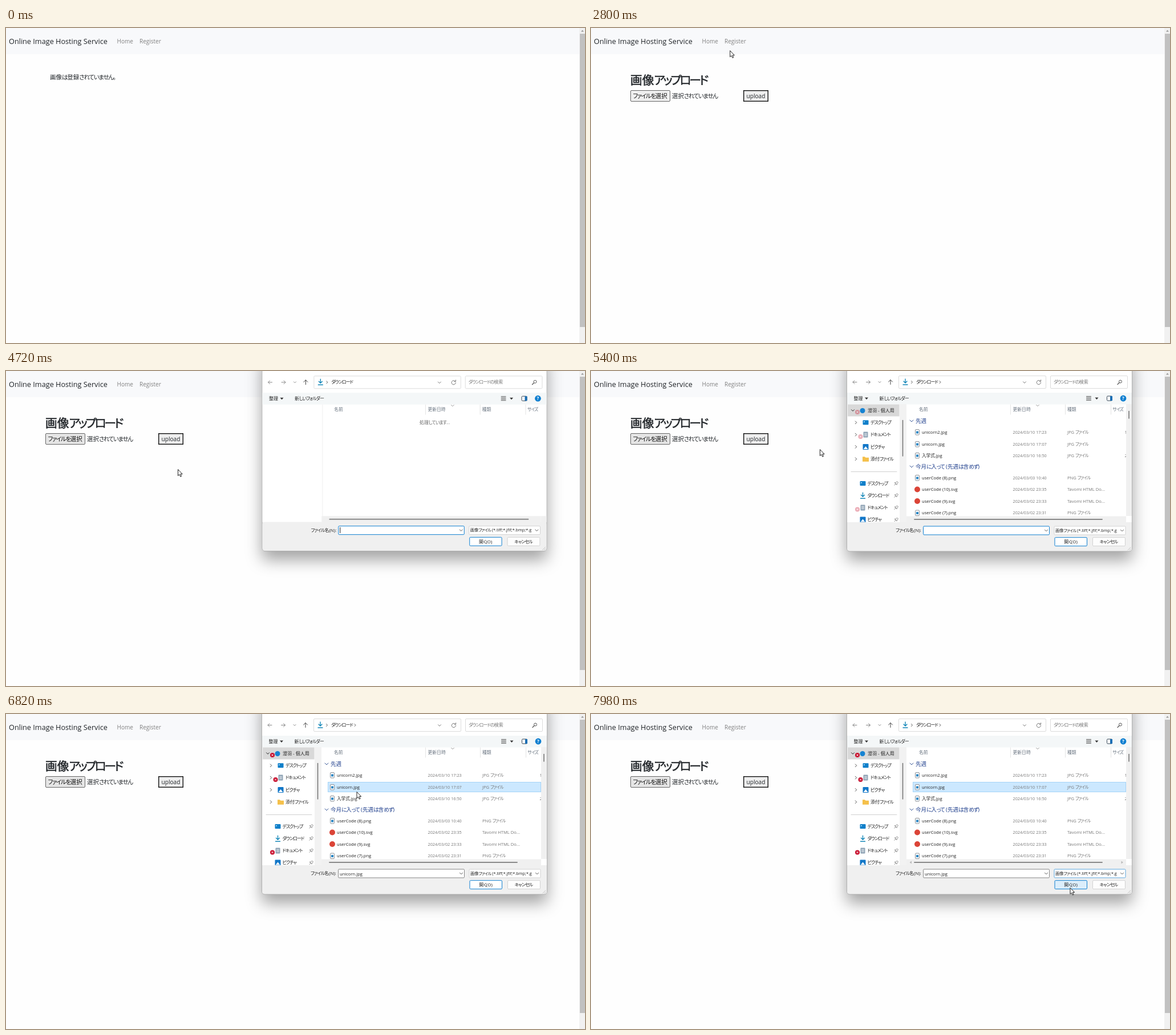
Animation of 1015x552 px, one loop 8000 ms. Source, as an HTML page:

```html
<!DOCTYPE html>
<html lang="ja">
<head>
<meta charset="utf-8">
<style>
html, body { margin: 0; width: 100%; height: 100%; overflow: hidden; background: #fefefe; }
svg { display: block; font-family: "Open Sans", "Noto Sans CJK JP", "Noto Sans CJK", sans-serif; }
text { white-space: pre; }
.kana { font-feature-settings: "palt"; letter-spacing: -.12em; }
.heading { stroke: #212529; stroke-width: .5; }
.heading .kana { letter-spacing: -.15em; }
.line { fill: none; stroke-linecap: round; stroke-linejoin: round; }
#window { filter: drop-shadow(0 15px 14px rgba(0, 0, 0, .36)); }
</style>
</head>
<body>
<svg id="stage" width="1015" height="552" viewBox="0 0 1015 552"></svg>
<script>
// Text is centred vertically on y; kana runs are set proportionally.
const text = (x, y, s, size = 8, fill = '#222', attrs = '') =>
  `<text x="${x}" y="${y + size * .36}" font-size="${size}" fill="${fill}" ${attrs}>` +
  s.replace(/[\u3040-\u30ff]+/g, '<tspan class="kana">$&</tspan>') + '</text>';
const rect = (x, y, w, h, fill, attrs = '') =>
  `<rect x="${x}" y="${y}" width="${w}" height="${h}" fill="${fill}" ${attrs}/>`;
const box = (x, y, w, h, fill, stroke, attrs = '') =>
  rect(x + .5, y + .5, w - 1, h - 1, fill, `stroke="${stroke}" rx="1.5" ${attrs}`);
const line = (d, color = '#555', width = 1, attrs = '') =>
  `<path class="line" d="${d}" stroke="${color}" stroke-width="${width}" ${attrs}/>`;
const dot = (x, y, r, fill) => `<circle cx="${x}" cy="${y}" r="${r}" fill="${fill}"/>`;
const down = (x, y, r = 2.5, color) => line(`M${x - r} ${y - r / 2}l${r} ${r}l${r} ${-r}`, color);
const right = (x, y, r = 2, color) => line(`M${x - r / 2} ${y - r}l${r} ${r}l${-r} ${r}`, color);
const triangle = (x, y) => `<path d="M${x - 3} ${y - 1.5}h6l-3 3.5z" fill="#333"/>`;
const group = (id, body, attrs = '') => `<g id="${id}" ${attrs}>${body}</g>`;

const icons = {
  desktop: (x, y) => rect(x - 5, y - 4, 10, 8, '#0f7fc9', 'rx="1"') + rect(x - 3.5, y - 2, 2, 1.5, '#bfe6ff'),
  download: (x, y) => line(`M${x} ${y - 5}v7m-3 -3l3 3l3 -3M${x - 4} ${y + 5}h8`, '#1487b8', 1.4),
  document: (x, y) => rect(x - 4, y - 5, 8, 10, '#8fa3b5', 'rx="1"') +
    line(`M${x - 2} ${y - 2}h4m-4 2h4m-4 2h4`, '#fff', .8),
  picture: (x, y) => rect(x - 5, y - 5, 10, 10, '#1277c8', 'rx="1"') +
    `<path d="M${x - 4} ${y + 4}l4 -5l4 5z" fill="#fff"/>`,
  folder: (x, y) => `<path d="M${x - 5.5} ${y - 4}h4l1.5 1.5h5.5v7h-11z" fill="#f5c04a"/>`,
  account: (x, y) => dot(x, y, 4.5, '#1683d2'),
  image: (x, y) => box(x - 4, y - 5, 8, 10.5, '#fff', '#8a8f96') + rect(x - 2, y - 1.5, 4, 4, '#2a86c4'),
  svg: (x, y) => dot(x, y, 5, '#db4437')
};
const alertMark = (x, y) => dot(x, y, 4, '#c8102e') + line(`M${x - 1.3} ${y - 1.3}l2.6 2.6m0 -2.6l-2.6 2.6`, '#fff', .9);
const pin = (x, y) => line(`M${x - 3} ${y + 3}l2.5 -2.5m-2 -1.5l3.5 3.5l.5 -2l2 -2l-2 -2l-2 2z`, '#777', .9);

const files = [
  [107, 'unicorn2.jpg', '03/10 17:23'], [128, 'unicorn.jpg', '03/10 17:07'],
  [148, '入学式.jpg', '03/10 16:50'], [187, 'userCode (8).png', '03/03 10:40'],
  [207.5, 'userCode (10).svg', '03/02 23:35'], [228, 'userCode (9).svg', '03/02 23:33'],
  [248.5, 'userCode (7).png', '03/02 23:31']
];
const fileRow = ([y, name, date], i) => {
  const ext = name.slice(-3), gray = '#777';
  return rect(564.5, y - 8.5, 373, 17, 'none', `id="row${i}"`) +
    icons[ext === 'svg' ? 'svg' : 'image'](572, y) + text(580, y, name, 7.6) +
    text(739.5, y, '2024/' + date, 7.3, gray) +
    text(835, y, ext === 'svg' ? 'Tavomi HTML Do...' : ext.toUpperCase() + ' ファイル', 7.6, gray) +
    (i === 0 || i === 2 ? text(935.5, y, i ? '2' : '1', 7.3, gray) : '');
};

const treeItems = [['desktop', 'デスクトップ'], ['document', 'ドキュメント'], ['picture', 'ピクチャ'], ['folder', '添付ファイル']];
const quickItems = [['desktop', 'デスクトップ'], ['download', 'ダウンロード'], ['document', 'ドキュメント'], ['picture', 'ピクチャ']];

const sidebar = rect(450, 58.5, 90.5, 21, '#d9d9d9') + down(459, 69, 2.5, '#222') + icons.account(476, 69.5) +
  text(485, 69, '澄羽 - 個人用') +
  treeItems.map(([icon, s], i) => {
    const y = 90.3 + i * 21.3;
    return right(464.5, y, 2.4) + icons[icon](481.5, y) + text(490, y, s);
  }).join('') +
  line('M456 176.5H536', '#d0d0d0') +
  quickItems.map(([icon, s], i) => {
    const y = 197 + i * 21.2;
    return icons[icon](476.5, y) + text(484.5, y, s) + pin(535, y);
  }).join('') +
  group('alerts', alertMark(467, 72) + alertMark(472.5, 115) + alertMark(467, 242.5)) +
  rect(541, 58, 12, 207, '#f2f2f2') + line('M546.5 86.5V149', '#777', 1.6);

const listing = files.map(fileRow).join('') +
  down(562, 87.5, 3, '#3c5a99') + text(569, 87.5, '先週', 9.6, '#1e3e8c') +
  down(562, 167.5, 3, '#3c5a99') + text(569, 167.5, '今月に入って (先週は含めず)', 9.6, '#1e3e8c') +
  rect(938, 58, 10, 196, '#f0f0f0') + line('M943 70.5V83', '#777', 1.6) +
  right(612, 19.5, 2);

const addressBar = line('M466 19.5h-7m3 -3l-3 3l3 3', '#888') + line('M482.5 19.5h7m-3 -3l3 3l-3 3', '#888') +
  down(506, 19.5, 2, '#888') + line('M525 23.5v-8m-3.5 3.5l3.5 -3.5l3.5 3.5', '#444') +
  box(539, 8, 259, 23, '#fff', '#dcdcdc') + icons.download(551, 19) + right(562.5, 19.5, 2) +
  text(570, 19, 'ダウンロード') + down(760, 20, 2.5, '#777') +
  line('M787.6 17.6a3.6 3.6 0 1 0 .9 2.4M788.6 15.5v2.6h-2.6', '#777') +
  box(805, 8, 136, 23, '#fff', '#dcdcdc') + text(811, 19, 'ダウンロードの検索', 8, '#777') +
  '<circle cx="928" cy="18.5" r="2.5" fill="none" stroke="#555"/>' + line('M926 20.5l-3 3', '#555', 1.2);

const toolbar = rect(449, 38, 499, 20.5, '#f4f7f8') + text(460.5, 48, '整理', 8) + triangle(483, 48) +
  text(505.5, 48, '新しいフォルダー') + line('M868.5 44.5h8m-8 2.3h8m-8 2.3h8m-8 2.3h8', '#444', .9) + triangle(886.5, 48) +
  box(904, 43.5, 10, 9, '#fff', '#345') + rect(910, 44, 4, 8, '#1a6fb5') +
  dot(933, 48, 5.4, '#0f7fd0') + text(933, 48, '?', 8, '#fff', 'text-anchor="middle" font-weight="700"');

const columns = [[575, '名前'], [739.5, '更新日時'], [835, '種類'], [914.5, 'サイズ']]
  .map(([x, s]) => text(x, 67, s, 7.8, '#66717e')).join('') +
  line('M735.5 59V76M831.5 59V76M911.5 59V76', '#e4e4e4') + line('M780.5 59.5l2.5 2l2.5 -2', '#888', .8);

const footer = rect(553, 254.5, 385, 11, '#f0f0f0') +
  line('M567 260H896', '#8a8a8a', 1.8, 'id="scroll"') +
  group('scrollEnds', '<path d="M562 257.5v5l-3.5 -2.5zM929.5 257.5v5l3.5 -2.5z" fill="#bbb"/>') +
  rect(449, 265, 499, 50, '#f0f0f0', 'rx="4"') +
  text(579, 279, 'ファイル名(N):', 8, '#222', 'text-anchor="end"') +
  box(582, 271.5, 222, 16, '#fff', '#0f7fd0', 'id="nameField"') + text(585, 280, 'unicorn.jpg', 7.6, '#222', 'id="fileName"') +
  line('M585.5 274.5V284', '#222', 1, 'id="caret"') + down(798, 279.5, 2.5) +
  box(811.5, 271.5, 126, 16, '#fff', '#d2d2d2', 'id="filter"') + text(814, 279, '画像ファイル (*.tiff;*.jfif;*.bmp;*.g', 7.3) +
  down(931, 279.5, 2.5) +
  box(812.5, 291.2, 57.5, 16, '#fff', '#0f7fd0', 'id="open"') + text(841, 299, '開く(O)', 8, '#222', 'text-anchor="middle"') +
  box(879, 291.2, 58, 16, '#fdfdfd', '#d2d2d2') + text(907.5, 299, 'キャンセル', 8, '#222', 'text-anchor="middle"') +
  line('M941 314l5 -5M944 314l2 -2', '#bbb', .8);

const dialog = rect(448.5, -30, 500, 346, '#f0f0f0', 'id="window" rx="5" stroke="#a5a5a5" stroke-width=".8"') +
  rect(449, -29, 499, 294, '#fff') + addressBar + toolbar + columns +
  group('waiting', line('M554.5 59V265', '#f0f0f0') + text(725, 90, '処理しています...', 8, '#666') + rect(938, 254.5, 10, 11, '#f0f0f0')) +
  group('loaded', sidebar + listing) + footer;

const uploadPage = text(69, 91.5, '画像アップロード', 20.7, '#212529', 'class="heading"') +
  box(69, 109, 70, 20, '#efefef', '#666', 'id="choose"') + text(73.5, 119, 'ファイルを選択', 10.4, '#111') +
  text(142, 119, '選択されていません', 10.4, '#212529') +
  rect(267.7, 109.7, 42.6, 18.6, '#efefef', 'stroke="#111" stroke-width="1.4"') + text(272.5, 119, 'upload', 10.1, '#212529');

const cursorStyle = 'fill="#fff" stroke="#222" stroke-width="1" stroke-linejoin="round"';
document.getElementById('stage').innerHTML =
  rect(0, 0, 1005, 46, '#f8f9fb') + text(5, 23, 'Online Image Hosting Service', 12.7, '#212529') +
  text(194.5, 23, 'Home', 10, '#808080') + text(234, 23, 'Register', 10, '#808080', 'id="register"') +
  group('emptyPage', text(77, 86.5, '画像は登録されていません。', 10.5, '#212529')) + group('uploadPage', uploadPage) +
  group('dialog', dialog) +
  rect(1005, 0, 10, 552, '#f1f1f1') + rect(1006, 10, 9, 514, '#c1c1c1') + '<path d="M1008 6.5l2.5 -3l2.5 3z" fill="#999"/>' +
  `<path id="arrow" ${cursorStyle} d="M.5 .5V11.5L3 9.3L4.8 13.2L6.6 12.4L4.9 8.6H8.2Z"/>` +
  `<path id="hand" ${cursorStyle} d="M-1 9V1.5a1.2 1.2 0 0 1 2.4 0V6l4 .8q1.3 .4 1.3 1.8V11q0 2 -1 4.5H-.2L-3.6 10.3q-.5 -1.2 .4 -1.7q1 -.3 2.2 1.4zM1.4 6v3M3.6 6.5v2.6"/>`;

const el = Object.fromEntries([...document.querySelectorAll('[id]')].map(e => [e.id, e]));
const show = (id, on) => el[id].style.display = on ? '' : 'none';
const set = (id, name, value) => el[id].setAttribute(name, value);

// Pointer moves: start ms, end ms, steps, then points as [progress, x, y].
const moves = [
  [320, 520, 4, [0, 967, 640], [1, 490, 241]],
  [780, 1530, 12, [0, 490, 241], [.4, 345, 90], [.667, 267, 20], [1, 262, 21]],
  [1600, 1730, 2, [0, 262, 21], [1, 257, 13]],
  [2800, 3290, 8, [0, 262, 22], [.8, 142, 132], [1, 124, 125]],
  [4440, 4930, 8, [0, 124, 125], [.625, 301, 172], [1, 301, 172]],
  [5130, 5880, 12, [0, 301, 172], [.417, 401, 137], [1, 606, 66]],
  [5950, 6350, 6, [0, 606, 66], [1, 612, 131]],
  [6560, 7080, 9, [0, 612, 131], [.34, 612, 131], [.556, 614.5, 136], [1, 748, 260]],
  [7350, 7980, 10, [0, 748, 260], [.65, 843, 282], [1, 839.5, 304]]
];
function pointer(t) {
  const move = moves.findLast(m => t >= m[0]);
  if (!move) return [0, 0];
  const [a, b, n, ...points] = move;
  const p = Math.min(1, (Math.floor((t - a) * (n - 1) / (b - a) + .05) + 1) / n);
  const i = Math.max(1, points.findIndex(q => q[0] >= p));
  const [p0, x0, y0] = points[i - 1], [p1, x1, y1] = points[i];
  const k = (p - p0) / (p1 - p0);
  return [x0 + (x1 - x0) * k, y0 + (y1 - y0) * k];
}

function draw(t) {
  const [x, y] = pointer(t);
  const visible = t >= 320 && (t < 2000 || t >= 2800);
  const onLink = t < 2000 && y < 36 && x > 230 && x < 276;
  show('arrow', visible && !onLink);
  show('hand', visible && onLink);
  for (const id of ['arrow', 'hand']) set(id, 'transform', `translate(${x} ${y})`);
  set('register', 'fill', t > 1320 && t < 2800 ? '#555' : '#808080');

  show('emptyPage', t < 2200);
  show('uploadPage', t >= 2200);
  const onChoose = t > 2800 && t < 4440 && x < 139 && y > 109 && y < 129;
  set('choose', 'fill', t >= 3540 && t < 3760 ? '#f5f5f5' : onChoose || t >= 3760 ? '#e5e5e5' : '#efefef');

  const q = Math.min(1, (t - 4580) / 200);
  show('dialog', q > 0);
  if (q <= 0) return;
  const scale = 1 - .09 * (1 - q) ** 3;
  set('dialog', 'transform', `translate(698.5 143) scale(${scale}) translate(-698.5 -143)`);
  set('dialog', 'opacity', Math.min(1, q * 2.5));

  const ready = t >= 4930, picked = t >= 6560;
  show('waiting', !ready);
  show('loaded', ready);
  set('scroll', 'd', `M567 260H${ready ? 896 : 916}`);
  set('alerts', 'opacity', t < 5950 ? .35 : 1);
  files.forEach(([rowY], i) => {
    const chosen = picked && i === 1;
    const hover = x > 564 && x < 937 && y < 254 && Math.abs(y - rowY) < 9.5;
    set('row' + i, 'fill', chosen ? '#cce8ff' : hover ? '#e5f3ff' : 'none');
    set('row' + i, 'stroke', chosen ? '#a5d4f7' : 'none');
  });
  show('fileName', picked);
  show('caret', t < 5130 || t >= 5660 && t < 6190);
  set('nameField', 'stroke', picked ? '#858585' : '#0f7fd0');
  show('scrollEnds', t > 7000);
  set('filter', 'stroke', x > 812 && y > 271 ? '#5aa5dc' : '#d2d2d2');
  set('open', 'fill', x > 812 && y > 291 ? '#dceefb' : '#fff');
}

const start = performance.now();
function tick() {
  draw((performance.now() - start) % 8000);
  requestAnimationFrame(tick);
}
tick();
</script>
</body>
</html>
```
